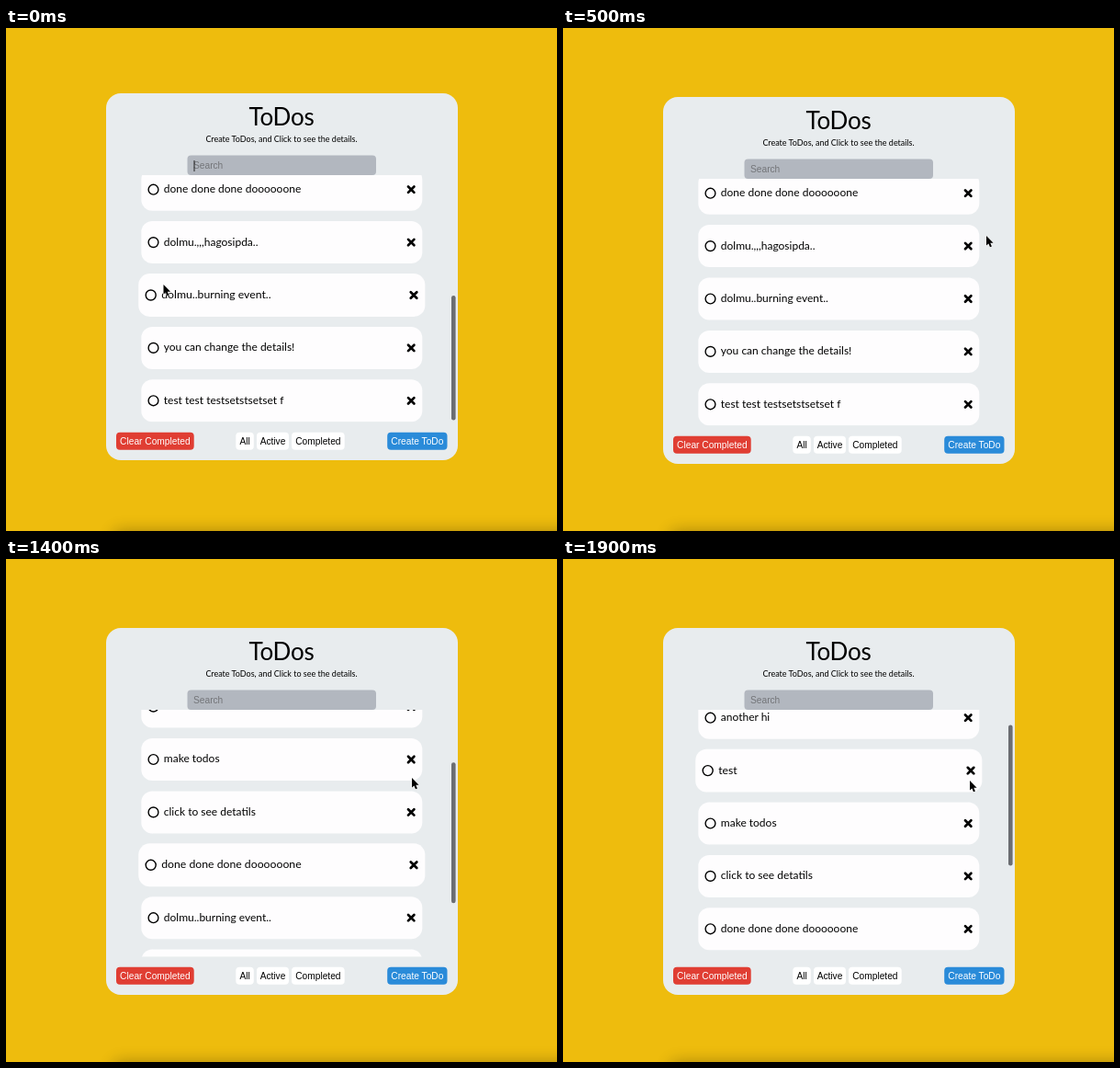
Write an HTML page that moves like this. It is 600 by 547 pixels and loops after 2 s.

```html
<!DOCTYPE html>
<html lang="en">
<head>
<meta charset="utf-8">
<title>ToDos</title>
<style>
  html, body { margin: 0; width: 100%; height: 100%; overflow: hidden; background: #eebc0d; }
  svg { display: block; }
  text { font: 12px Lato, "Noto Sans", sans-serif; }
  .title { font-size: 26px; text-anchor: middle; letter-spacing: -.2px; }
  .sub { font-size: 9px; text-anchor: middle; }
  .ui { font: 10.2px "Liberation Sans", Arial, sans-serif; }
  .mid { text-anchor: middle; }
</style>
</head>
<body>
<svg id="stage" width="600" height="547" viewBox="0 0 600 547">
  <defs>
    <clipPath id="view"><rect x="130" y="164" width="345" height="268.5"/></clipPath>
    <filter id="blur" x="-20%" y="-200%" width="140%" height="500%"><feGaussianBlur stdDeviation="9"/></filter>
  </defs>
  <rect x="118" y="548" width="620" height="30" opacity=".32" filter="url(#blur)"/>
  <g id="card">
    <rect x="109" y="75" width="383" height="399" rx="16" fill="#e8ecee"/>
    <text class="title" x="300" y="110">ToDos</text>
    <text class="sub" x="300" y="127.7">Create ToDos, and Click to see the details.</text>
    <g id="list" clip-path="url(#view)"></g>
    <rect x="197.5" y="142.5" width="205.5" height="21.5" rx="4" fill="#b2b7bf"/>
    <text class="ui" x="204" y="157" fill="#737579">Search</text>
    <rect id="caret" x="204.5" y="148" width="1" height="12" fill="#222"/>
    <rect id="bar" x="485" width="4.6" rx="2.3" fill="#6b6d72"/>
    <g id="buttons"></g>
  </g>
  <path id="cursor" d="M0 0V10.6L2.4 8.4 4 12.2 5.9 11.4 4.3 7.7H7.6Z" stroke="#fff" stroke-width="1" paint-order="stroke"/>
</svg>
<script>
const $ = id => document.getElementById(id);
const STEP = 100, STEPS = 20, REMOVED = 5, REMOVE_AT = 12;
const items = ["another hi", "test", "make todos", "click to see detatils",
  "done done done doooooone", "dolmu.,,,hagosipda..", "dolmu..burning event..",
  "you can change the details!", "test test testsetstsetset f"];

// Pointer tip at each step; the last point of the pause is held
const path = [[171.5, 279], [305, 276], [425, 269], [453, 242], [461, 229], [461, 226],
  [460, 226], [454, 229], [446, 234], [442, 237]];
const pointer = s => s < 10 ? path[s] : s < 18 ? [442, 238] : s < 19 ? [442, 239] : [443, 241];

// Hovered item with its start, end (exclusive)
const hovers = [[6, 0, 3], [5, 8, 12], [4, 12, 16], [1, 16, 20]];
const scroll = s => s < 14 ? 0 : [95, 162, 164.5][Math.min(s - 14, 2)];
const barAlpha = s => s < 3 || s > 6 ? 1 : [.8, .3, 0, 0][s - 3];

function row(label, y, hovered) {
  const scale = hovered ? 1.02 : 1;
  return `<g transform="translate(300.3 ${y}) scale(${scale})">
    <rect x="-153" y="-23" width="306" height="46" rx="12" fill="#fefdfe"/>
    <circle cx="-139.8" r="5.4" fill="none" stroke="#000" stroke-width="1.4"/>
    <text x="-128.5" y="3.4">${label}</text>
    <path d="M137.7-3.2l6.4 6.4m0-6.4l-6.4 6.4" stroke="#000" stroke-width="2.7" stroke-linecap="round"/>
  </g>`;
}

function button(label, x, w, fill, color) {
  return `<rect x="${x}" y="443.8" width="${w}" height="19" rx="4" fill="${fill}"/>
    <text class="ui mid" x="${x + w / 2}" y="456.9" fill="${color}">${label}</text>`;
}

function draw(s) {
  const removed = s >= REMOVE_AT, shift = scroll(s);
  const bottom = 409.3 + (removed ? .7 : 0) + shift;
  const hover = hovers.find(([, from, to]) => s >= from && s < to);
  const hot = hover ? hover[0] : -1;
  const shown = items.map((label, id) => ({ label, id })).filter(i => !removed || i.id !== REMOVED);
  $("list").innerHTML = shown.map(({ label, id }, i) =>
    row(label, bottom - 57.4 * (shown.length - 1 - i), id === hot)).join("");

  $("card").setAttribute("transform", `translate(0 ${[-4, -1][s] || 0})`);
  $("caret").setAttribute("opacity", s ? 0 : 1);
  $("bar").setAttribute("y", removed ? 277 - .587 * shift : 295);
  $("bar").setAttribute("height", removed ? 153 : 135.5);
  $("bar").setAttribute("opacity", barAlpha(s));
  $("cursor").setAttribute("transform", `translate(${pointer(s)})`);
}

$("buttons").innerHTML =
  button("Clear Completed", 120, 84.7, "#e03e33", "#fff") +
  button("All", 250.3, 19.5, "#fff", "#000") +
  button("Active", 273, 35, "#fff", "#000") +
  button("Completed", 311, 57.7, "#fff", "#000") +
  button("Create ToDo", 415.2, 65.3, "#2a8bd9", "#fff");

const start = performance.now();
let last = -1;
function tick() {
  const s = Math.floor((performance.now() - start) / STEP) % STEPS;
  if (s !== last) draw(last = s);
  requestAnimationFrame(tick);
}
tick();
</script>
</body>
</html>
```
